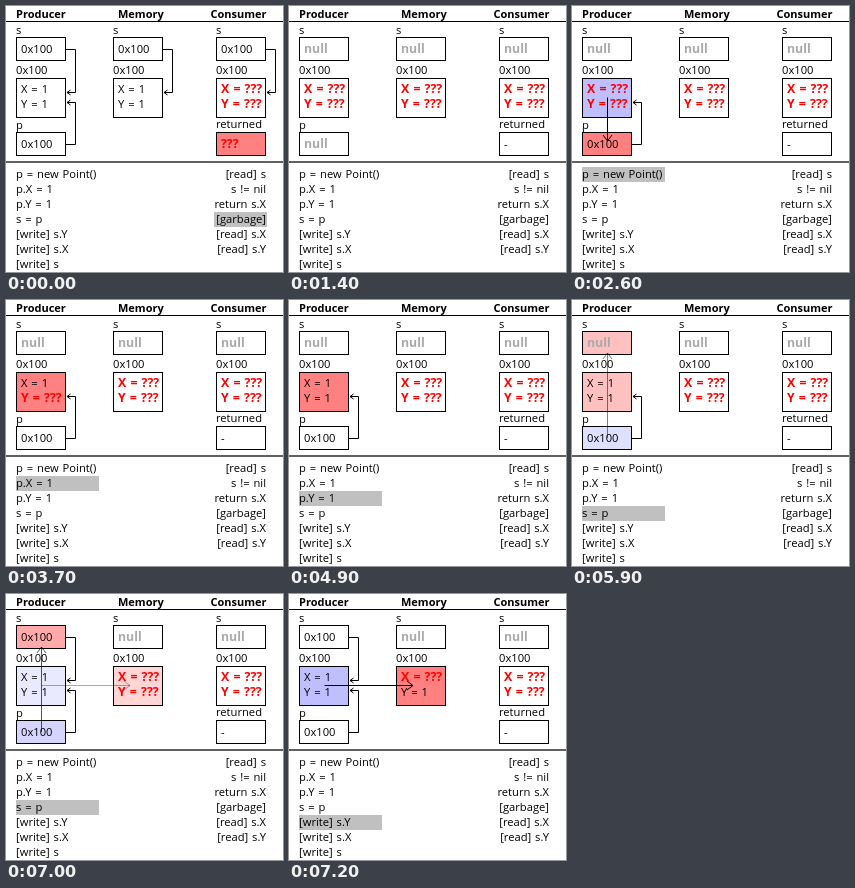
An HTML page for the animation above (8000 ms loop, 277 px wide and 266 px high).

```html
<!DOCTYPE html>
<html lang="en">
<head>
<meta charset="utf-8">
<title>Memory reordering</title>
<style>
html, body { margin: 0; width: 100%; height: 100%; overflow: hidden; background: #fff; }
svg { display: block; }
text { font: 11.2px "Open Sans", "Noto Sans", sans-serif; word-spacing: 1px; white-space: pre; }
.head { font-weight: 700; font-size: 11px; }
.null, .unset { font-weight: 700; font-size: 12.3px; }
.null { fill: #a9a9a9; }
.unset { fill: #f00; }
</style>
</head>
<body>
<svg id="stage" width="277" height="266" viewBox="0 0 277 266"></svg>
<script>
const LOOP = 8000, STEP = 100;
const WHITE = [255, 255, 255], RED = [255, 128, 128], BLUE = [191, 191, 255];
const COLS = [10, 107, 210], WIDTH = 50;
const BOX = { s: [31, 24], xy: [72, 40], p: [126, 24] };
const LEFT = ['p = new Point()', 'p.X = 1', 'p.Y = 1', 's = p', '[write] s.Y', '[write] s.X', '[write] s'];
const RIGHT = ['[read] s', 's != nil', 'return s.X', '[garbage]', '[read] s.X', '[read] s.Y'];

// Each column holds s, X, Y and the bottom cell.
const REF = '0x100', U = '???';
const empty = ['null', U, U, 'null'], reader = ['null', U, U, '-'];
const made = ['null', U, U, REF], setX = ['null', '1', U, REF], setY = ['null', '1', '1', REF];
const linked = [REF, '1', '1', REF];

// at: start, steps: fade length, fill: box colours, arrow: data flow, line: active statement
const SCENES = [
  { at: 0, steps: 1, cols: [linked, [REF, '1', '1'], [REF, U, U, U]], fill: { p2: RED }, line: 10 },
  { at: 1400, steps: 1, cols: [empty, reader, reader], fill: {}, line: -1 },
  { at: 2400, steps: 3, cols: [made, reader, reader], fill: { xy0: BLUE, p0: RED }, arrow: [35.5, 91.5, 35.5, 135], line: 0 },
  { at: 3600, steps: 2, cols: [setX, reader, reader], fill: { xy0: RED }, line: 1 },
  { at: 4700, steps: 3, cols: [setY, reader, reader], fill: { xy0: RED }, line: 2 },
  { at: 5900, steps: 2, cols: [linked, reader, reader], fill: { p0: BLUE, s0: RED }, arrow: [35.5, 138, 35.5, 53], line: 3 },
  { at: 7000, steps: 3, cols: [linked, ['null', U, '1'], reader], fill: { xy0: BLUE, xy1: RED }, arrow: [35.5, 91.5, 124, 91.5], line: 4 }
];

const text = (x, y, s, cls = '', anchor = 'start') =>
  `<text x="${x}" y="${y}" class="${cls}" text-anchor="${anchor}">${s}</text>`;
const rect = (x, y, w, h, fill, stroke = 'none') =>
  `<rect x="${x}" y="${y}" width="${w}" height="${h}" fill="${fill}" stroke="${stroke}"/>`;
const path = (d, alpha = 1) => `<path d="${d}" fill="none" stroke="#000" stroke-opacity="${alpha}"/>`;
const mix = (a, b, k) => `rgb(${a.map((v, i) => Math.round(v + (b[i] - v) * k))})`;
const kind = v => v === 'null' ? 'null' : v.includes(U) ? 'unset' : '';

function pointer(x, from, to) {
  const edge = x + WIDTH;
  return path(`M${edge} ${from}H${edge + 9.5}V${to}H${edge + 1}`) +
    path(`M${edge + 4.5} ${to - 2.5}L${edge + 1} ${to}L${edge + 4.5} ${to + 2.5}`);
}

function arrow(a, alpha) {
  if (!a || alpha <= 0) return '';
  const [x1, y1, x2, y2] = a, len = Math.hypot(x2 - x1, y2 - y1);
  const ux = (x2 - x1) / len, uy = (y2 - y1) / len;
  const barb = s => `${x2 - 6 * ux - 4.5 * s * uy} ${y2 - 6 * uy + 4.5 * s * ux}`;
  return path(`M${x1} ${y1}L${x2} ${y2}M${barb(1)}L${x2} ${y2}L${barb(-1)}`, alpha);
}

function column(i, cells, color) {
  const x = COLS[i], [s, X, Y, low] = cells;
  const box = name => {
    const [y, h] = BOX[name];
    return rect(x + .5, y + .5, WIDTH - 1, h - 1, color(name + i), '#000');
  };
  const value = (y, v) => text(x + 5, y, v, kind(v));
  let out = text(x, 28, 's') + box('s') + value(47, s) +
    text(x, 68, REF) + box('xy') + value(87, 'X = ' + X) + value(102, 'Y = ' + Y);
  if (i !== 1) out += text(x, i ? 122 : 123, i ? 'returned' : 'p') + box('p') + value(142, low);
  if (s === REF) out += pointer(x, 43.5, 86.5);
  if (low === REF) out += pointer(x, 138.5, 96.5);
  return out;
}

function listing(active) {
  let out = '';
  if (active >= 0) {
    const right = active >= LEFT.length, row = right ? active - LEFT.length : active;
    out += rect(right ? 208 : 10, 161 + row * 15, right ? 53 : 83, 15, '#c0c0c0');
  }
  LEFT.forEach((s, i) => out += text(10, 172 + i * 15, s));
  RIGHT.forEach((s, i) => out += text(260, 172 + i * 15, s, '', 'end'));
  return out;
}

function draw(n, k) {
  const now = SCENES[n], old = SCENES[n - 1] || now;
  const cols = (k > .5 ? now : old).cols;
  const color = id => mix(old.fill[id] || WHITE, now.fill[id] || WHITE, k);
  return rect(0, 0, 277, 266, '#fff') +
    text(10, 12, 'Producer', 'head') + text(112, 12, 'Memory', 'head') + text(260.5, 12, 'Consumer', 'head', 'end') +
    rect(0, 15, 277, 1, '#000') + rect(0, 155, 277, 2, '#606060') +
    cols.map((c, i) => column(i, c, color)).join('') +
    arrow(old.arrow, 1 - k) + arrow(now.arrow, k) +
    listing((k >= .5 ? now : old).line);
}

const stage = document.getElementById('stage'), start = performance.now();
let shown = '';
function tick() {
  const t = (performance.now() - start) % LOOP;
  const n = SCENES.findLastIndex(s => t >= s.at), { at, steps } = SCENES[n];
  const k = Math.min(steps, Math.floor((t - at) / STEP) + 1) / steps;
  const key = n + ':' + k;
  if (key !== shown) {
    stage.innerHTML = draw(n, k);
    shown = key;
  }
  requestAnimationFrame(tick);
}
tick();
</script>
</body>
</html>
```
